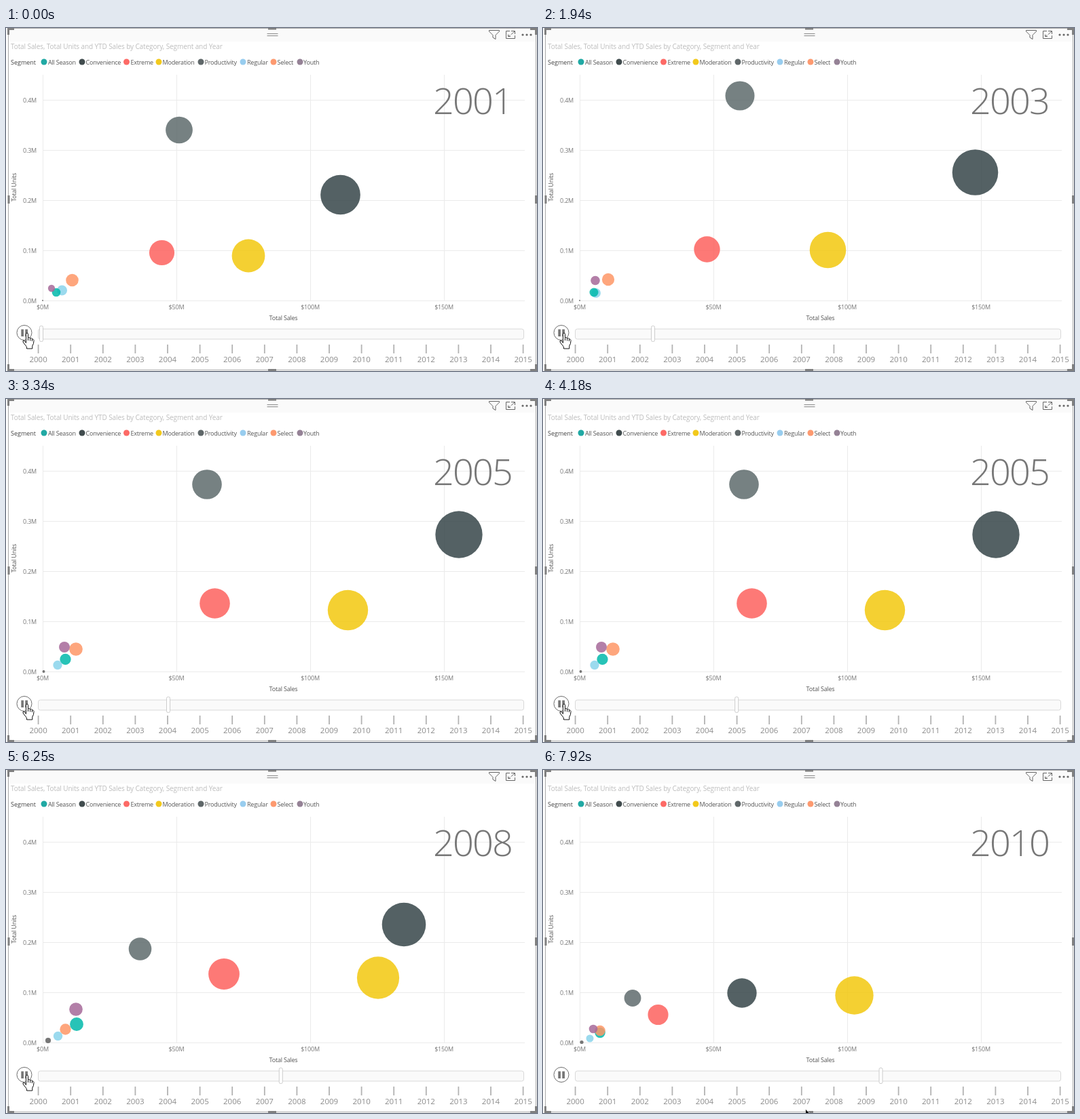
Recreate the animation shown at these times as an HTML page. Size 782 by 506 pixels, loop 7.99 s.

```html
<!DOCTYPE html>
<html lang="en">
<head>
<meta charset="utf-8">
<title>Sales bubble chart</title>
<style>
html, body { margin: 0; width: 100%; height: 100%; overflow: hidden; background: #fff; }
svg { display: block; }
text { font: 9px "Open Sans", "Noto Sans", sans-serif; letter-spacing: -.2px; fill: #777; }
</style>
</head>
<body>
<svg id="stage" width="782" height="506" viewBox="0 0 782 506"></svg>
<script>
const LOOP = 7990, FRAME = 69.5;
const AXIS = 47.6; // slider start and distance between years

// name, bubble colour, legend colour, legend dot x, legend text x
const SEGMENTS = [
  ['All Season', '#01b8aa', '#21a9a4', 56, 62],
  ['Convenience', '#374649', '#414c4e', 112, 117.5],
  ['Extreme', '#fd625e', '#fd6a66', 177.5, 183.5],
  ['Moderation', '#f2c80f', '#f2c91c', 225, 230.5],
  ['Productivity', '#5f6b6d', '#5f6769', 287, 292.5],
  ['Regular', '#8ad4eb', '#98cdef', 349, 355],
  ['Select', '#fe9666', '#fd9a70', 394, 399.5],
  ['Youth', '#a66999', '#958296', 433, 438],
  ['', '#5f5f5f']
];

// bubble centres x, y in segment order
const CENTRES = {
  2001: [74,390, 492.5,246, 229.5,331.5, 357,336, 255,150.5, 82.5,387, 97.5,372, 67,384, 54,402],
  2003: [75,390, 636.5,213, 241.5,326.5, 419.5,327.5, 290,100, 78,391, 96,371, 77,372.5, 54,402],
  2005: [87.5,384, 667,200, 307.5,301.5, 503.5,311.5, 296,126, 76,392.5, 103,369, 86,366, 55.5,402],
  2007: [96,380, 617,220, 341.5,292, 582,298, 257,204, 74,393.5, 104.5,372, 88.5,368, 56.5,401.5],
  2008: [104,375, 586,228, 321,301, 548,306.5, 197.5,264, 76.5,392.5, 87.5,382.5, 103,353, 62,399],
  2010: [84,387.5, 293,329, 169.5,361, 458.5,332.5, 132,336.5, 69,396, 84,384.5, 74,382, 57,401.5]
};
for (const y of [2002, 2004, 2006, 2009])
  CENTRES[y] = CENTRES[y - 1].map((v, i) => (v + CENTRES[y + 1][i]) / 2);
CENTRES[2004].splice(8, 2, 293, 101);
CENTRES[2006].splice(2, 2, 695, 201);

// slider position: step, x
const SLIDER = [[0, 52], [28, 162], [48, 239], [60, 285.2], [76, 353], [84, 382], [96, 427.5], [114, 497.5]];

const stage = document.getElementById('stage');
function add(tag, attrs, text, parent = stage) {
  const el = document.createElementNS('http://www.w3.org/2000/svg', tag);
  set(el, attrs);
  if (text) el.textContent = text;
  return parent.appendChild(el);
}
function set(el, attrs) {
  for (const k in attrs) el.setAttribute(k, attrs[k]);
}
const label = (x, y, text, style = '', anchor = 'start') =>
  add('text', { x, y, style, 'text-anchor': anchor }, text);
const stroke = (d, color, width = 1, fill = 'none') =>
  add('path', { d, fill, stroke: color, 'stroke-width': width });
const box = (x, y, width, height, fill, more) => add('rect', { x, y, width, height, fill, ...more });

// window frame and header
box(0, 0, 782, 506, '#fff');
box(4, 1, 776, 19, '#fafafa');
stroke('M3.5 .5H780.5V504.5H3.5Z', '#a9a9a9');
stroke('M2 1.5H12M3.5 0V10M772 1.5H782M780.5 0V10M2 504.5H12M3.5 496V506M772 504.5H782M780.5 496V506' +
  'M386 1H398M386 504.5H398M4 247V259M780.5 247V259', '#808080', 3);
stroke('M384.5 8.5H400.5M384.5 11.5H400.5', '#888');
stroke('M711.5 3.5H726.5V5L721 10.5V16.5L717 14V10.5L711.5 5Z', '#666');
stroke('M742 4.5H736.5V15.5H749.5V11M744 4.5H749.5V9M749 5L744 9.5M740 12.5L742.5 10M739.5 9.5V12.5H743', '#666');
for (const cx of [761, 767, 773]) add('circle', { cx, cy: 10, r: 1.6, fill: '#666' });
label(7, 31, 'Total Sales, Total Units and YTD Sales by Category, Segment and Year',
  'font-size:10px;letter-spacing:-.1px;fill:#bdbdbd');

// legend
label(7, 53.5, 'Segment', 'letter-spacing:0;fill:#444');
for (const [name, , fill, cx, x] of SEGMENTS.slice(0, 8)) {
  add('circle', { cx, cy: 50, r: 4.5, fill });
  label(x, 53.5, name, 'fill:#555');
}

// grid
for (let i = 0; i < 5; i++) {
  const y = Math.round(402 - i * 74) + .5;
  stroke(`M54 ${y}H764`, '#ebebeb');
  label(45, y + 3, `0.${i}M`, '', 'end');
}
for (let i = 0; i < 4; i++) {
  const x = 54 + i * 197;
  stroke(`M${x + .5} 69V403`, '#ebebeb');
  label(x, 414.5, `$${i * 50}M`, '', 'middle');
}
label(408.5, 430.5, 'Total Sales', 'fill:#555', 'middle');
set(label(0, 0, 'Total Units', 'fill:#555', 'middle'), { transform: 'translate(14.5 235) rotate(-90)' });

const year = label(629, 127, '2001', 'font-size:54px;font-weight:300;letter-spacing:-1.8px');
const plot = add('g', { 'fill-opacity': .85 });
const bubbles = SEGMENTS.map(s => add('circle', { fill: s[1] }, '', plot));

// play axis
box(47.5, 444, 715, 15, '#fafafa', { rx: 3, stroke: '#d9d9d9' });
for (let i = 0; i < 16; i++) {
  const x = AXIS * (i + 1);
  stroke(`M${x} 467V480`, '#b3b3b3', 1.8);
  label(x, 493, 2000 + i, 'font-size:11.5px;letter-spacing:0;fill:#8a8a8a', 'middle');
}
const knob = box(0, 439.5, 5, 23, '#fff', { rx: 2, stroke: '#ccc' });
add('circle', { cx: 27, cy: 449.5, r: 11, fill: '#fff', stroke: '#6d6d6d' });
box(22.3, 444.5, 3.7, 10.5, '#777');
box(28.3, 444.5, 3.7, 10.5, '#777');

const hand = stroke('M29.5 462V451.8Q29.5 450 31 450T32.5 451.8V457.5Q33 456.4 34.5 456.8T35.6 458' +
  'Q36.4 457 37.5 457.6T38.4 459Q39.4 458.4 40.3 459.4T41 461.5Q41 466 38.8 469V473H30.5V470.5' +
  'Q28 467 25.5 464Q24.2 461.5 25.8 461T28.5 463.5L29.5 464.5ZM32.5 457.5V461M35.6 458V461.5M38.4 459V462',
  '#111', 1, '#fff');
const arrow = stroke('M0 0V13L3 10.3L5 15L7 14L5 9.6H9.2Z', '#fff', .8, '#000');

function sliderAt(step) {
  const i = SLIDER.findIndex((k, n) => n && step <= k[0]);
  const [s0, x0] = SLIDER[i - 1], [s1, x1] = SLIDER[i];
  return x0 + (x1 - x0) * (step - s0) / (s1 - s0);
}

let shown = 0;
function showYear(y) {
  if (y === shown) return;
  shown = y;
  year.textContent = y;
  const c = CENTRES[y];
  bubbles.forEach((b, i) => {
    const cx = c[2 * i];
    set(b, { cx, cy: c[2 * i + 1], r: 1.4 * Math.sqrt(cx - 53.5) });
  });
  // small bubbles lie on top of large ones
  [...bubbles].sort((a, b) => b.getAttribute('r') - a.getAttribute('r')).forEach(b => plot.append(b));
}

function draw(t) {
  const step = Math.min(114, Math.floor(t / FRAME + .2));
  const x = sliderAt(step);
  set(knob, { x: x - 2.5 });
  showYear(2000 + Math.floor(x / AXIS));

  const k = Math.max(0, (step - 109) / 5);
  hand.style.display = k ? 'none' : '';
  arrow.style.display = k ? '' : 'none';
  set(arrow, { transform: `translate(${31 + 355.5 * k} ${450 + 50 * k})` });
}

let start;
function tick(now) {
  start ??= now;
  draw((now - start) % LOOP);
  requestAnimationFrame(tick);
}
draw(0);
requestAnimationFrame(tick);
</script>
</body>
</html>
```
